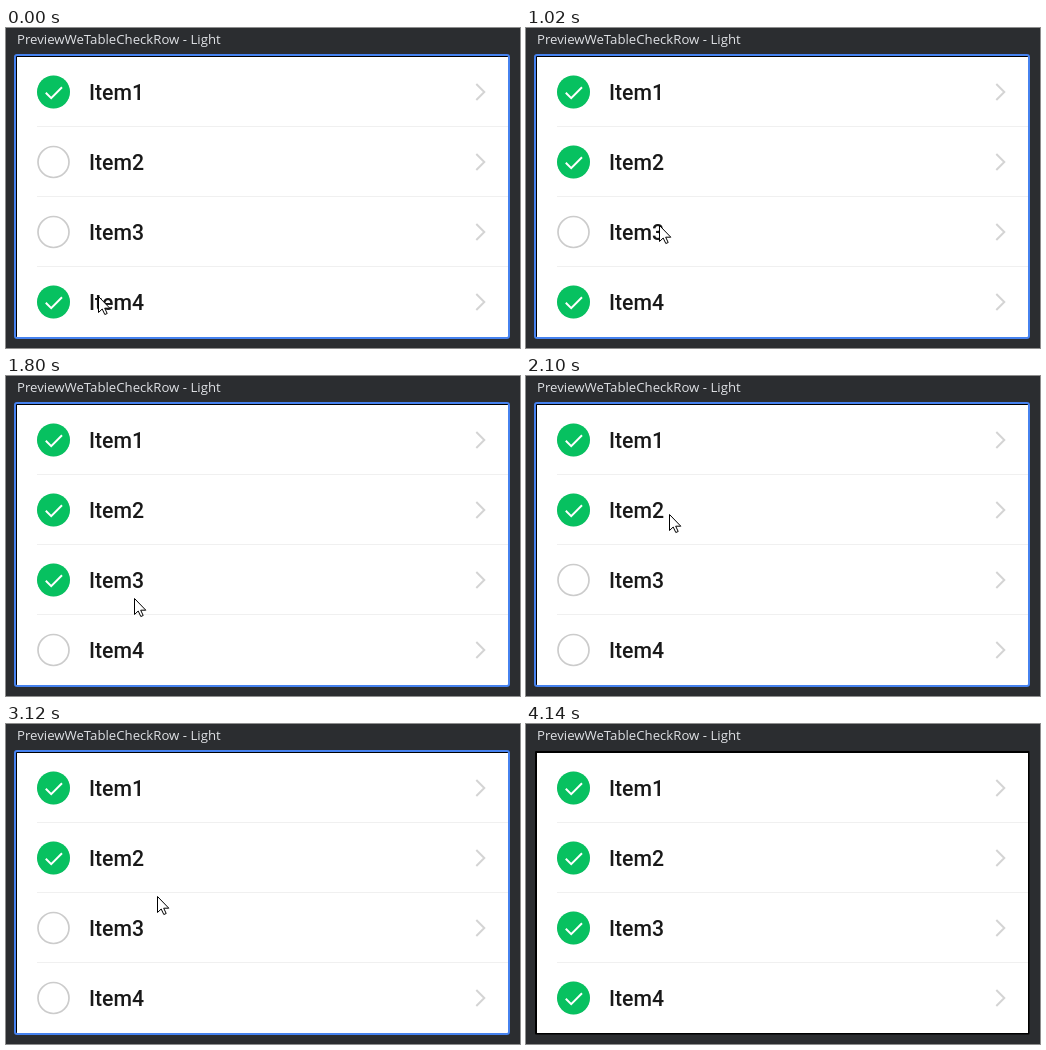
Recreate the animation shown at these times as an HTML page. Size 514x320 px, loop 5.22 s.

```html
<!DOCTYPE html>
<html lang="en">
<head>
<meta charset="utf-8">
<style>
  html, body { margin: 0; width: 100%; height: 100%; overflow: hidden; background: #2b2d30; }
  svg { display: block; }
  .title { font: 13.2px "Open Sans", "Noto Sans", sans-serif; fill: #dfe1e5; }
  .label { font: 500 21.25px Roboto, sans-serif; fill: #191919; }
</style>
</head>
<body>
<svg width="514" height="320" viewBox="0 0 514 320">
  <text class="title" x="11" y="16">PreviewWeTableCheckRow - Light</text>
  <rect x="9" y="27" width="494.5" height="283.5" rx="1" fill="#000"/>
  <rect x="11" y="29" width="491" height="280" fill="#fff"/>
  <g id="rows"></g>
  <rect id="focus" x="9" y="27" width="494" height="283" rx="2" fill="none" stroke="#4682ef" stroke-width="2"/>
  <path id="cursor" d="M.5.5V16.5L4.2 13L6.8 18.5L9.2 17.5L6.7 12.2H11.8Z" fill="#fff" stroke="#000" stroke-width="1"/>
</svg>
<script>
const LOOP = 5220, STEP = 60, ROW_HEIGHT = 70;
const PRESS_LEVELS = [0.04, 0.09, 0.05];
const initialChecks = [true, false, false, true];

// [time, row]: each press toggles its row one step later
const presses = [
  [600, 1], [1140, 2], [1620, 3], [1860, 2], [2220, 1],
  [2400, 0], [2760, 0], [2940, 1], [3240, 2], [3540, 3]
];

// [time, x, y] of the pointer tip
const pointerPath = [
  [0, 92, 268], [180, 136, 196], [300, 167, 128], [420, 160, 110],
  [720, 160, 110], [1020, 133, 197], [1260, 133, 197], [1560, 117, 273],
  [1680, 117, 273], [1860, 132, 204], [1920, 132, 204], [2100, 143, 138],
  [2280, 143, 138], [2400, 150, 80], [2460, 150, 80], [2640, 152, 75],
  [2820, 152, 75], [2940, 151, 135], [3000, 151, 140], [3120, 151, 172],
  [3240, 151, 200], [3300, 151, 200], [3480, 150, 265], [3780, 150, 268],
  [4080, 165, 313]
];

const byId = id => document.getElementById(id);
const show = (node, visible) => node.setAttribute("visibility", visible ? "visible" : "hidden");

byId("rows").innerHTML = initialChecks.map((_, i) => `
  <g transform="translate(0 ${29 + i * ROW_HEIGHT})">
    ${i < 3 ? '<path d="M31 69.5H502" stroke="#f0f0f0"/>' : ""}
    <circle cx="47.5" cy="35" r="15.5" fill="none" stroke="#cccccc" stroke-width="1.7"/>
    <g class="check">
      <circle cx="47.5" cy="35" r="16.5" fill="#07c160"/>
      <path d="M39.8 35.8L45.2 41.2L56 30.2" fill="none" stroke="#fff" stroke-width="2"/>
    </g>
    <text class="label" x="83" y="42.5">Item${i + 1}</text>
    <path d="M470.3 27L478.3 35L470.3 43" fill="none" stroke="#d4d4d4" stroke-width="2"/>
    <rect class="press" x="11" width="491" height="${i < 3 ? 69 : 70}" opacity="0"/>
  </g>`).join("");

const checks = document.querySelectorAll(".check");
const highlights = document.querySelectorAll(".press");

function pointerAt(time) {
  const next = pointerPath.findIndex(key => key[0] > time);
  if (next < 0) return pointerPath.at(-1).slice(1);
  const [t0, x0, y0] = pointerPath[next - 1];
  const [t1, x1, y1] = pointerPath[next];
  const p = (time - t0) / (t1 - t0);
  const eased = p * p * (3 - 2 * p);
  return [x0 + (x1 - x0) * eased, y0 + (y1 - y0) * eased].map(Math.round);
}

function draw(now) {
  const time = Math.floor((now % LOOP) / STEP) * STEP;
  const checked = [...initialChecks];
  const levels = [0, 0, 0, 0];
  for (const [start, row] of presses) {
    if (time >= start + STEP) checked[row] = !checked[row];
    levels[row] += PRESS_LEVELS[(time - start) / STEP] || 0;
  }
  checked.forEach((on, i) => {
    show(checks[i], on);
    highlights[i].setAttribute("opacity", levels[i]);
  });
  byId("cursor").setAttribute("transform", `translate(${pointerAt(time)})`);
  show(byId("cursor"), time < 4140);
  show(byId("focus"), time < 4140);
}

function tick() {
  draw(performance.now());
  requestAnimationFrame(tick);
}
tick();
</script>
</body>
</html>
```
